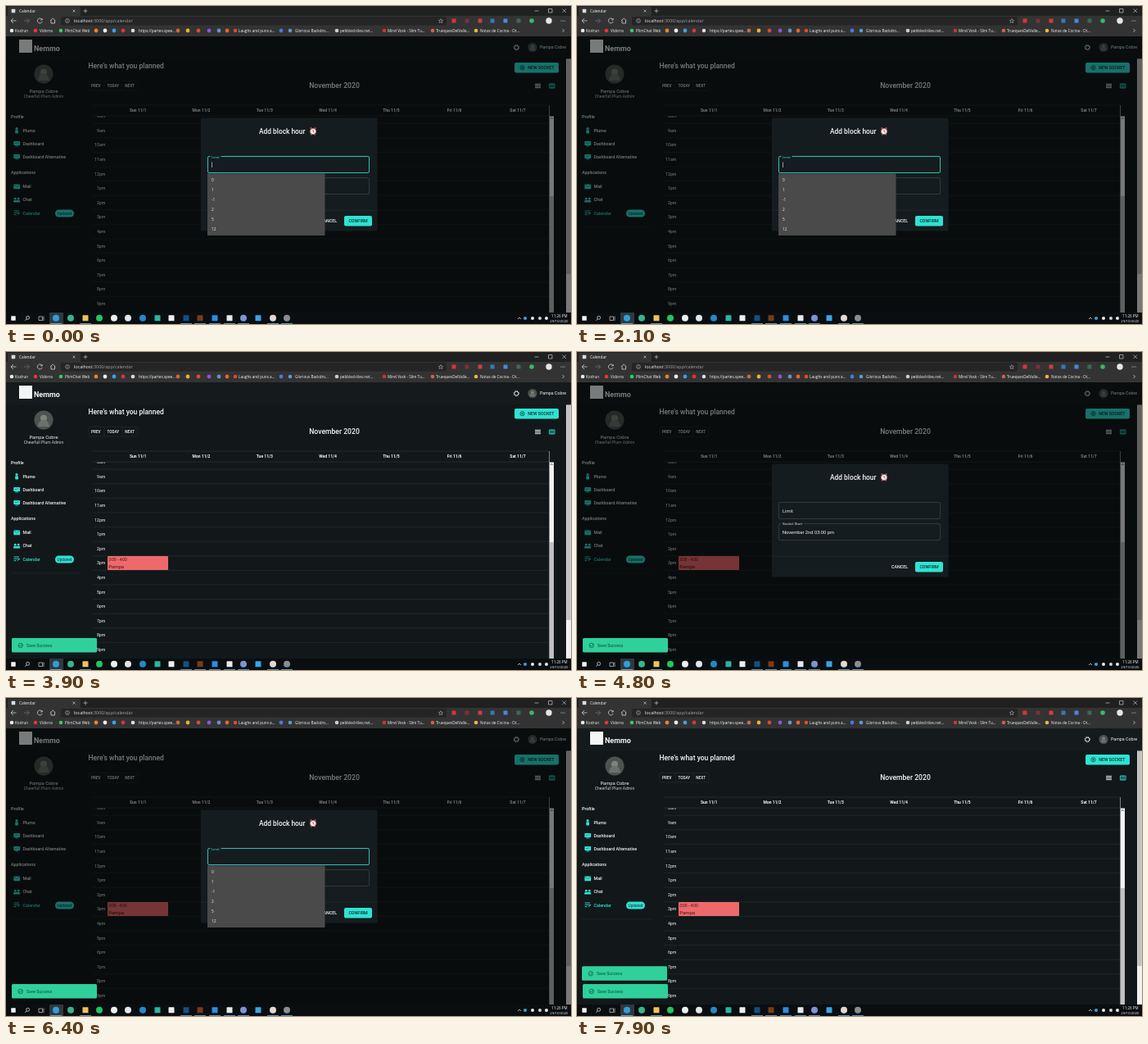
An HTML page for the animation above (8 s loop, 690 by 388 pixels).

```html
<!DOCTYPE html>
<html lang="en">
<head>
<meta charset="utf-8">
<title>Calendar</title>
<style>
html, body { margin: 0; width: 100%; height: 100%; overflow: hidden; background: #12181a; }
svg { display: block; width: 690px; height: 388px; font-family: Roboto, Arial, sans-serif; }
.ui { font-family: "Open Sans", "Noto Sans", sans-serif; }
</style>
</head>
<body>
<svg id="stage" viewBox="0 0 690 388"></svg>
<script>
const TEAL = '#2fe3d3', INK = '#0e2a2a', WHITE = '#f4f6f6', PAPER = '#151c1f', EDGE = '#454d50';
const LOOP = 8000;

const rect = (x, y, w, h, fill, more = '') =>
  `<rect x="${x}" y="${y}" width="${w}" height="${h}" fill="${fill}" ${more}/>`;
const dot = (x, y, r, fill, more = '') =>
  `<circle cx="${x}" cy="${y}" r="${r}" fill="${fill}" ${more}/>`;
const square = (x, y, s, fill) => rect(x - s / 2, y - s / 2, s, s, fill, 'rx=".6"');
const line = (d, stroke, w = .7, more = '') =>
  `<path d="${d}" fill="none" stroke="${stroke}" stroke-width="${w}" ${more}/>`;
const text = (x, y, s, size, fill = WHITE, more = '') =>
  `<text x="${x}" y="${y}" font-size="${size}" fill="${fill}" ${more}>${s}</text>`;
const MID = 'text-anchor="middle" ', END = 'text-anchor="end" ', BOLD = 'font-weight="500" ';
const join = (list, f) => list.map(f).join('');

function browser() {
  const marks = [
    [7, 11, 'Kodrun', '#e8e8e8'], [36, 41, 'Vidorra', '#e33'], [67, 72, 'PlimChat Web', '#3c6'],
    [155, 162, 'https://partes.spee...', '#ddd'], [280, 284, 'Laughs and puns a...', '#e5472f'],
    [347, 353, 'Glorious Backdro...', '#5a9bd8'], [404, 408, 'pebbled-tiles.net...', '#ccc'],
    [462, 466, 'Mirel Vosk - Slim Tu...', '#c33'], [521, 525, 'TruequesDelValle...', '#d95a4a'],
    [574, 579, 'Notas de Cocina - Ot...', '#e9b640']
  ];
  const small = [[110, '#e8832a'], [121, '#eee'], [132, '#3aa0e8'], [143, '#d33'], [210, '#c96a3a'],
    [222, '#e8b030'], [235, '#d84a30'], [248, '#8a55d8'], [260, '#6a8fd0'], [270, '#e8622a'], [336, '#4a78d8']];
  const tools = [[547, '#d8343a'], [563, '#7d3034'], [579, '#d23b43'], [594, '#3479b8'],
    [610, '#4b86de'], [626, '#3c6b50']];
  return `<g class="ui">` +
    rect(0, 0, 690, 12, '#202020') + rect(2, 1, 89, 11, '#333', 'rx="1.5"') +
    square(9, 6, 4.5, '#ddd') + text(16, 7.8, 'Calendar', 4.8) +
    line('M81.5 4.5l3 3m0-3l-3 3M94.5 6h5M97 3.5v5M645.5 6h5M679.5 3.5l4.5 4.5m0-4.5l-4.5 4.5', '#ddd', .6) +
    line('M662.5 3.5h4.5v4.5h-4.5z', '#ddd', .6) +
    rect(0, 12, 690, 25, '#333') + rect(67, 13, 471, 10.5, '#252525', 'rx="2"') +
    line('M12.5 18h-6.5m3-3l-3 3 3 3', '#e4e4e4') + line('M22 18h6.5m-3-3l3 3-3 3', '#777') +
    line('M44 16.5a3 3 0 1 0 .2 2.5m0-4v2h-2', '#e4e4e4') + line('M54 18l3.2-3 3.2 3M55 17.5v3.5h4.5v-3.5', '#e4e4e4') +
    dot(75, 18, 2.4, 'none', 'stroke="#bbb" stroke-width=".6"') + line('M75 17.5v2M75 16.2v.6', '#bbb', .6) +
    text(83, 20, 'localhost<tspan fill="#a0a4a6">:3000/app/calendar</tspan>', 5.4) +
    line('M531 15.6l.8 1.7 1.8.2-1.3 1.2.4 1.8-1.7-.9-1.7.9.4-1.8-1.3-1.2 1.8-.2z', '#ccc', .5) +
    join(tools, ([x, c]) => square(x, 18, 5, c)) + dot(642, 18, 2.8, '#38b86a') +
    dot(663, 18, 3.7, '#e6e6e6') + join([678, 680, 682], x => dot(x, 18, .55, '#ddd')) +
    join(marks, ([i, x, s, c]) => dot(i, 30, 2.3, c) + text(x, 31.8, s, 4.65)) +
    join(small, ([x, c]) => dot(x, 30, 2.4, c)) + line('M679.5 28l2 2-2 2', '#ddd') + '</g>';
}

function taskbar() {
  const apps = [[61, '#2f9fd8'], [79, '#35b58a'], [97, '#f0c453', 1], [114, '#22c65e'], [132, '#eee'],
    [149, '#dfe6ec'], [167, '#2489c9'], [185, '#28b6a2', 1], [202, '#eee', 1], [220, '#15507e', 1],
    [237, '#7a3b12', 1], [255, '#2c8de0', 1], [273, '#e8e8e8', 1], [290, '#7f93d0'], [308, '#39a4e6', 1],
    [326, '#e4d8d0'], [343, '#8a8c90']];
  const open = [61, 97, 220, 237, 255, 273, 290, 326, 343];
  const tray = [[634, '#35a7dd'], [643, '#e8e8e8'], [652, '#cfd4d8'], [660, '#e8e8e8']];
  return `<g class="ui">` + rect(0, 374, 690, 14, '#0a0e11') + rect(53, 374, 17, 14, '#30383e') +
    square(9, 381, 5.5, '#f2f2f2') +
    dot(26.6, 380.3, 2, 'none', 'stroke="#eee" stroke-width=".7"') + line('M25.2 381.8l-2 2', '#eee') +
    line('M40 379h4.5v4.5h-4.5zM46 378.5v5.5', '#eee', .6) +
    join(apps, ([x, c, sq]) => sq ? square(x, 380.8, 7, c) : dot(x, 380.8, 4, c)) +
    join(open, x => rect(x - 7, 387.2, 14, .8, '#6fb4e0')) +
    line('M625 382l2-2 2 2', '#eee') + join(tray, ([x, c]) => dot(x, 381, 2, c)) +
    text(685.5, 379.8, '11:26 PM', 4.5, WHITE, END) + text(686.5, 386, '29/10/2020', 4.2, WHITE, END) + '</g>';
}

function avatar(x, y, r) {
  return dot(x, y, r, '#4d544f') + dot(x, y - r * .2, r * .35, '#7d827b') +
    `<path d="M${x - r * .6} ${y + r * .7}a${r * .6} ${r * .75} 0 0 1 ${r * 1.2} 0z" fill="#6c726b"/>`;
}

function sidebar() {
  const screen = y => rect(9.3, y - 3, 7.8, 5, TEAL, 'rx=".6"') + line(`M11 ${y + 3}h4.5M13.2 ${y + 2}v1`, TEAL) +
    line(`M11 ${y - .5}h2l1-1 1.2 1`, '#145a56', .6);
  const items = [['Plumo', 152], ['Dashboard', 168], ['Dashboard Alternative', 184], ['Mail', 220.3], ['Chat', 236.6]];
  return rect(16, 41, 16, 16, WHITE) + text(34, 55, 'Nemmo', 9, WHITE, 'font-weight="700"') +
    avatar(46, 83, 11.5) +
    text(46, 105.5, 'Pampa Cobre', 5.8, WHITE, MID) + text(46, 112.2, 'Cheerfull Plum Admin', 5, '#cfd4d4', MID) +
    text(6, 136.6, 'Profile', 5.4, WHITE, BOLD) + text(6, 205.3, 'Applications', 5.4, WHITE, BOLD) +
    join(items, ([s, y]) => text(20.5, y + 1.8, s, 5.3, WHITE, BOLD)) +
    dot(13, 149.5, 1.6, TEAL) + rect(11.2, 151.3, 3.8, 4.2, TEAL, 'rx="1"') + screen(168) + screen(184) +
    rect(9.3, 217.5, 7.8, 5.8, TEAL, 'rx=".5"') + line('M9.5 218l3.7 2.7 3.7-2.7', '#145a56', .6) +
    dot(11.2, 235.2, 1.4, TEAL) + dot(15.2, 235.2, 1.4, TEAL) + rect(9, 237, 8.2, 2.6, TEAL, 'rx="1.2"') +
    line('M9.5 250h6.5M9.5 252.3h6.5M9.5 254.6h3M14 255l3-3', TEAL, .9) +
    text(20.5, 254.6, 'Calendar', 5.3, TEAL, BOLD) +
    rect(60, 248.5, 23, 9, TEAL, 'rx="4.5"') + text(71.5, 254.6, 'Updated', 4.8, INK, MID) +
    line('M6 270h86', '#222a2c', .5);
}

function calendar() {
  const days = ['Sun', 'Mon', 'Tue', 'Wed', 'Thu', 'Fri', 'Sat'], step = 77.3, row = 17.6, left = 122.5;
  let grid = '';
  for (let i = 0; i < 14; i++) {
    const y = 125.6 + i * row, h = 8 + i;
    if (i) grid += line(`M106 ${y}H663.5`, '#293133', .6);
    grid += text(121.5, y + 10.6, (h > 12 ? h - 12 : h) + (h < 12 ? 'am' : 'pm'), 5.3, WHITE, END);
  }
  return text(100.5, 76.4, "Here's what you planned", 8.5, WHITE, BOLD) +
    rect(621, 69, 54, 12.5, TEAL, 'rx="2"') + dot(630.5, 75.2, 2.6, 'none', `stroke="${INK}" stroke-width=".7"`) +
    line('M629 75.2h3M630.5 73.7v3', INK, .6) + text(637.3, 77.1, 'NEW SOCKET', 5.2, INK, BOLD) +
    rect(101, 91.5, 60, 11.5, 'none', 'rx="1.5" stroke="#2a3234" stroke-width=".5"') +
    line('M120 91.5v11.5M142 91.5v11.5', '#2a3234', .5) +
    join([[104, 'PREV'], [123.5, 'TODAY'], [145.2, 'NEXT']], ([x, s]) => text(x, 98.9, s, 4.7, WHITE, BOLD)) +
    text(401, 100.3, 'November 2020', 8.65, WHITE, MID + BOLD) +
    line('M646 95.2h7M646 96.7h7M646 98.2h7M646 99.7h7', '#d8dcdc', .9) +
    line('M663.5 95h6.5v5h-6.5zM665.7 95v5M667.9 95v5', TEAL, .9) +
    '<clipPath id="body"><path d="M100 134H664V374H100z"/></clipPath>' +
    `<g clip-path="url(#body)">${grid}</g>` +
    line('M106 121H663.5M106 134.2H663.5', '#30383a', .6) + line('M663.5 121V135', '#a8adae', .7) +
    join(days, (d, i) => text(left + step * (i + .5), 129, `${d} 11/${i + 1}`, 5, WHITE, MID + 'font-weight="700"')) +
    rect(663.5, 134.5, 5.5, 239.5, '#f1f1f1') + rect(664, 232, 5, 142, '#c1c1c1') +
    line('M665 138l1.4-1.6 1.4 1.6', '#444', .8) +
    `<g id="event">${rect(124, 249, 74, 17, '#ee696c', 'rx="1"')}${text(125.2, 255.2, '3:00 - 4:00', 4.9, '#3a1517')}${text(125.2, 263.6, 'Pampa', 6, '#3a1517')}</g>`;
}

function page() {
  return rect(0, 37, 690, 337, '#12181a') + rect(0, 37, 690, 27.5, '#151b1d') + sidebar() +
    dot(623.3, 50.6, 2.5, 'none', 'stroke="#ddd" stroke-width="1"') +
    dot(623.3, 50.6, 3.3, 'none', 'stroke="#ddd" stroke-width=".8" stroke-dasharray="1.3 1.3"') +
    avatar(643, 50.5, 5.5) + text(652, 52.3, 'Pampa Cobre', 5.3) + calendar() +
    rect(684, 64.5, 6, 309.5, '#f1f1f1') + rect(684.3, 65, 5.4, 262, '#c1c1c1');
}

function dialog() {
  return rect(0, 37, 690, 337, '#000', 'opacity=".5"') +
    rect(238, 136.5, 215.5, 138, PAPER, 'rx="1.5"') +
    text(309, 155.6, 'Add block hour', 8.35, WHITE, BOLD) +
    line('M371.5 149.5l1.6-1M378.5 149.5l-1.6-1M372.3 157.3l1-1M377.7 157.3l-1-1', '#d9666a', 1.2) +
    dot(375, 153, 3.6, '#f7f0ee', 'stroke="#d9666a" stroke-width=".8"') + line('M375 151v2.2l1.4.8', '#333', .7) +
    '<rect id="field" x="246.5" y="183.5" width="197" height="20" rx="1.5" fill="none"/>' +
    rect(249.5, 182.5, 13, 2.5, PAPER, 'id="notch"') +
    text(251, 185.5, 'Limit', 4.3, TEAL, 'id="label"') + text(251, 195.8, '', 5.75, WHITE, 'id="value"') +
    rect(251, 190.5, .6, 6.5, WHITE, 'id="caret"') +
    rect(246.5, 209.5, 197, 20, 'none', `rx="1.5" stroke="${EDGE}" stroke-width=".6"`) +
    rect(249.5, 208.5, 27, 2.5, PAPER) + text(251, 211.2, 'Socket Start', 4.4, '#e3e6e7') +
    text(251, 221.6, '', 5.75, WHITE, 'id="start"') + line('M238 249.3H453.5', '#262e31', .6) +
    text(384, 264, 'CANCEL', 5.3, WHITE, BOLD) +
    rect(413, 256, 34, 12.5, TEAL, 'id="confirm" rx="2"') + text(430, 264, 'CONFIRM', 5.3, INK, MID + BOLD) +
    '<g id="menu" class="ui"></g>';
}

const snack = id => `<g id="${id}">` + rect(7, 349, 104, 17.5, '#2fd09a', 'rx="1.5"') +
  dot(17.7, 358, 2.7, 'none', 'stroke="#0d4a38" stroke-width=".7"') + line('M16.4 358l1 1.1 2.4-2.6', '#0d4a38') +
  text(25, 359.9, 'Save Success', 5.1, '#0d4a38') + '</g>';

stage.innerHTML = page() + `<g id="modal">${dialog()}</g>` + snack('snackA') + snack('snackB') + browser() + taskbar();

const $ = id => document.getElementById(id);
const set = (id, attrs) => { for (const k in attrs) $(id).setAttribute(k, attrs[k]); };
const ramp = (t, from, span) => {
  const p = Math.min(1, Math.max(0, (t - from) / span));
  return p * p * (3 - 2 * p);
};

const ALL = ['0', '1', '-1', '2', '5', '12'];
// start time, typed value, suggestions
const steps = [
  [0, '', ALL], [1000, '-', ['-1']], [1500, '-1', ['-1']], [2000, '', ALL], [2300, '0', ['0']],
  [2700, '0', []], [4000, '', []], [5800, '', ALL], [6800, '1', []]
];

let shown = '';
function showMenu(options) {
  const key = options.join();
  if (key === shown) return;
  shown = key;
  const single = options.length === 1;
  $('menu').innerHTML = options.length
    ? rect(246, 204.5, 143.5, single ? 14.5 : 75.5, single ? '#585858' : '#4a4a4a') +
      join(options, (s, i) => text(251, 213.6 + i * 12.1, s, 4.7))
    : '';
}

function draw(t) {
  const second = t >= 4000;
  const [since, value, options] = steps.filter(s => s[0] <= t).pop();
  const focus = second ? ramp(t, 5600, 200) : 1;
  const hover = second ? ramp(t, 7050, 200) : ramp(t, 2800, 200);
  const opacity = second ? ramp(t, 4450, 225) - ramp(t, 7450, 195) : 1 - ramp(t, 3420, 195);
  const caretOn = focus === 1 && hover < .5 && (t - since) % 1060 < 530;

  set('modal', { opacity });
  set('event', { opacity: t >= 3600 ? 1 : 0 });
  set('field', { stroke: focus > .3 ? '#2bc4b7' : EDGE, 'stroke-width': focus > .3 ? 1 : .6 });
  set('notch', { opacity: focus });
  set('label', {
    y: 195.8 - 10.3 * focus, 'font-size': 5.75 - 1.45 * focus, fill: focus > .3 ? TEAL : '#e6e9ea'
  });
  $('value').textContent = value;
  $('start').textContent = `November ${second ? '2nd' : '1st'} 03:00 pm`;
  set('caret', { x: 251 + value.length * 1.8, opacity: caretOn ? 1 : 0 });
  set('confirm', { fill: `rgb(${47 - 8 * hover},${227 - 48 * hover},${211 - 40 * hover})` });
  showMenu(options);

  const push = ramp(t, 7600, 200);
  set('snackA', { opacity: ramp(t, 3600, 225), transform: `translate(${-push} ${-21.7 * push})` });
  set('snackB', { opacity: ramp(t, 7600, 225) });
}

const begin = performance.now();
function frame() {
  draw((performance.now() - begin) % LOOP);
  requestAnimationFrame(frame);
}
frame();
</script>
</body>
</html>
```
